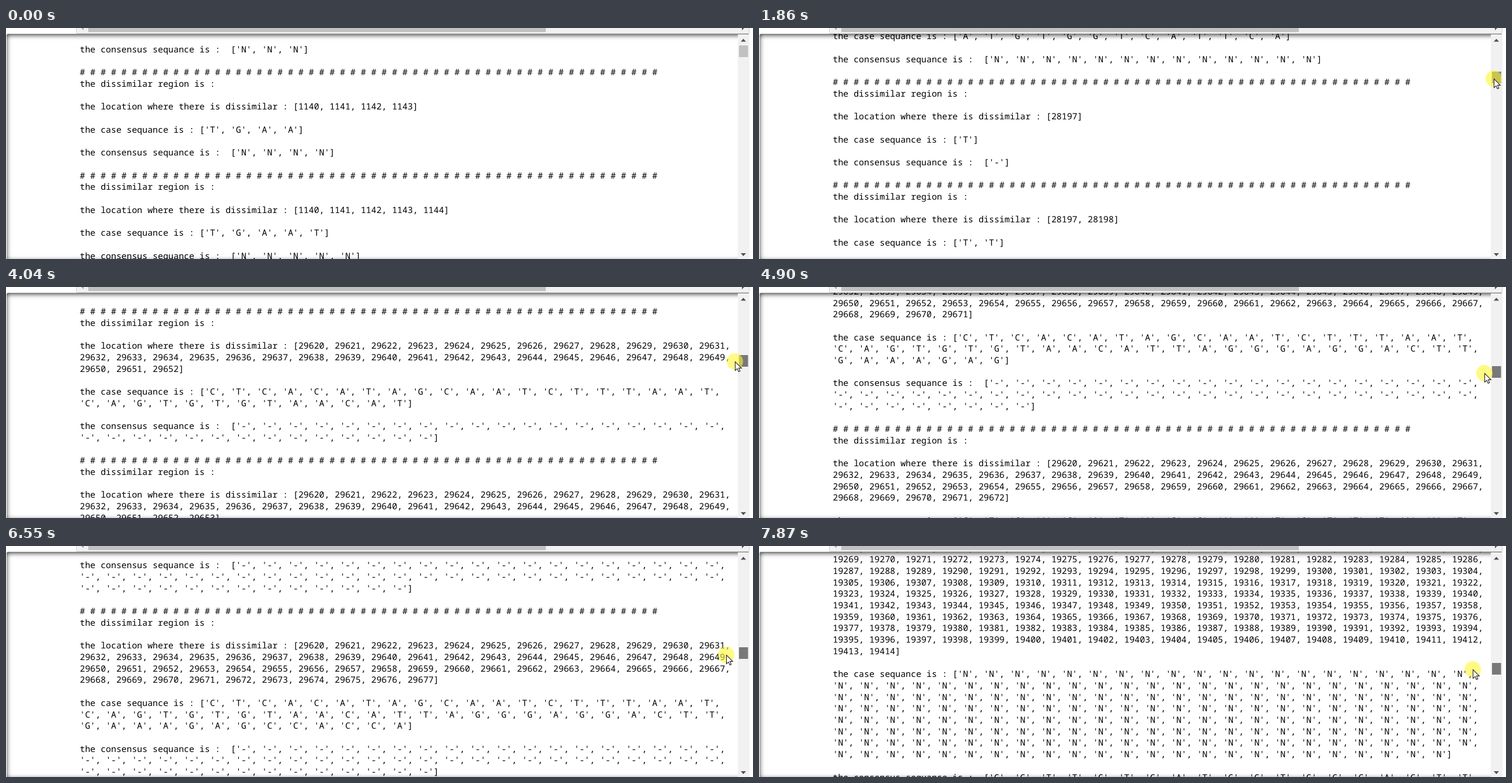
An HTML page that plays this animation: 1280x397 px, repeating every 8000 ms.

```html
<!DOCTYPE html>
<html lang="en">
<head>
<meta charset="utf-8">
<title>Sequence comparison output</title>
<style>
  html, body { margin: 0; width: 100%; height: 100%; overflow: hidden; background: #fff; }
  #stage { position: relative; width: 1280px; height: 397px; overflow: hidden; }
  #panel {
    position: absolute; left: 1px; top: 10px; width: 1273px; height: 388px; overflow: hidden;
    border-radius: 3px; box-shadow: inset 0 2px 9px rgba(0, 0, 0, .8);
  }
  #out {
    position: absolute; left: 125.5px; top: 0; margin: 0; white-space: pre; color: #000;
    font: 14.867px/19.7px "Noto Sans Mono", monospace;
    font-variant-ligatures: none; text-rendering: geometricPrecision;
  }
  svg { position: absolute; left: 0; top: 0; }
</style>
</head>
<body>
<div id="stage">
  <div id="panel"><pre id="out"></pre></div>
  <svg width="1280" height="397" viewBox="0 0 1280 397">
    <rect x="120.5" y="-5" width="1153" height="14.5" rx="2" fill="#f1f1f1" stroke="#cfcfcf"/>
    <rect x="141" y="0" width="784" height="7" fill="#c1c1c1"/>
    <path d="M133 -5V4L128.500 -.5Z" fill="#a3a3a3"/>
    <path d="M1261 -5V4L1265.500 -.5Z" fill="#505050"/>
    <rect x="1254" y="11" width="20" height="386" fill="#f1f1f1"/>
    <path d="M1259 23.500H1268L1263.500 18.500ZM1259 387H1268L1263.500 392Z" fill="#505050"/>
    <rect id="thumb" x="1256" y="30" width="15.500" height="20"/>
    <g id="mouse">
      <circle id="press" r="14" fill="rgb(255,246,50)" fill-opacity=".6"/>
      <path d="M.5 .5V15.500L4 12.300L6.300 17.500L8.800 16.400L6.500 11.400H11.300Z"
            fill="#fff" stroke="#222" stroke-width="1.100"/>
    </g>
  </svg>
</div>
<script>
const LOOP = 8000, COLS = 125, ROW = 19.7;
const $ = id => document.getElementById(id);

// Known beginnings of the sequences, keyed by position
const genes = {
  1140: 'TGAATGCAACCAAATGTGCCTTTCAACTCTCATGAAGTGTGATCATTGTGGTGAAACTTCATGG',
  19221: 'GGTTGTGATGGTGGCAGTT',
  27827: 'ATTTGTCACGCCTAAACGAACATGAAATTTCTTGTTTTCTTAGGAATCATCACAACTGTAGCTGCATTT' +
    'CACCAAGAATGTAGTTTACAGTCATGTACTCAACATCAACCATATGTAGTTGATGACCCGTGTCCTATTCACTTC' +
    'TATTCTAAATGGTATATTAGAGTAG',
  28184: 'ATGTGGTCATTCA',
  28197: 'TTCTAAAC',
  29620: 'CTCACATAGCAATCTTTAATCAGTGTGTAACATTAGGGAGGACTTGAAAGAGCCACCACATTTTCACC'
};

function base(start, i) {
  const known = genes[start] || '';
  if (i < known.length) return known[i];
  const r = Math.sin((start + i) * 12.9898) * 43758.5453;
  return 'ACGT'[Math.floor((r - Math.floor(r)) * 4)];
}

function wrap(head, items) {
  const lines = [];
  let line = head + '[';
  items.forEach((item, i) => {
    const word = item + (i < items.length - 1 ? ',' : ']');
    const next = line + (i ? ' ' : '') + word;
    if (next.length > COLS) { lines.push(line); line = word; }
    else line = next;
  });
  return [...lines, line];
}

// mark: letter standing for a gap; gapInCase: the gap is in the case row
function section(start, n, mark, gapInCase) {
  const list = f => Array.from({ length: n }, (_, i) => f(i));
  const seq = list(i => `'${base(start, i)}'`), gap = list(() => `'${mark}'`);
  return [
    '# '.repeat(56), 'the dissimilar region is :', '',
    ...wrap('the location where there is dissimilar : ', list(i => start + i)), '',
    ...wrap('the case sequance is : ', gapInCase ? gap : seq), '',
    ...wrap('the consensus sequance is :  ', gapInCase ? seq : gap), ''
  ];
}

// y: middle of the first line; each following section is one base longer
function page(y, start, n, mark, gapInCase, lead = []) {
  const lines = [...lead];
  for (let k = 0; y + lines.length * ROW < 420; k++) lines.push(...section(start, n + k, mark, gapInCase));
  return { text: lines.join('\n'), top: y - 20.3 };
}

// time, thumb top, pointer x, pointer y, page
const steps = [
  [0, 30, 1259, 41, page(-100.1, 1140, 3, 'N')],
  [1390, 56, 1259, 68, page(-120, 1140, 31, 'N')],
  [1780, 75, 1259, 87, page(-102.7, 28197, 1, '-', false, section(28184, 13, 'N'))],
  [2320, 78, 1258, 90, page(-64, 29620, 41, '-')],
  [3360, 81, 1257, 94, page(-71.5, 1140, 57, 'N')],
  [3890, 105, 1252, 117, page(-88, 29620, 12, '-')],
  [3970, 112, 1250, 123, page(-20, 29620, 26, '-')],
  [4040, 117, 1249, 128, page(43.4, 29620, 33, '-')],
  [4440, 126, 1246, 138, page(-135, 1140, 48, 'N')],
  [4820, 136, 1243, 148, page(-70, 29620, 52, '-')],
  [5300, 146, 1239, 158, page(-210, 27827, 118, 'N', true)],
  [5770, 155, 1236, 168, page(-282.9, 27827, 245, 'N', true)],
  [6160, 165, 1235, 178, page(-110, 29620, 37, '-')],
  [6550, 174, 1234, 187, page(-202.2, 29620, 57, '-')],
  [6780, 186, 1230, 199, page(-150, 19221, 92, 'N', true)],
  [7790, 201, 1223, 212, page(-94.2, 19221, 194, 'N', true)]
];

// Pointer comes in from the right edge and curves up to the thumb
function approach(t) {
  const i = Math.min(8, Math.floor((t - 70) / 77.5));
  const p = i / 8, e = p * p * (3 - 2 * p), q = 1 - e;
  const mix = (a, b, c) => q * q * a + 2 * q * e * b + e * e * c;
  return [mix(1272, 1202, 1259), mix(371, 240, 41)];
}

let shown;
function draw(t) {
  const [, top, px, py, view] = steps.findLast(s => s[0] <= t);
  if (view !== shown) {
    shown = view;
    $('out').textContent = view.text;
    $('out').style.transform = `translateY(${view.top}px)`;
  }
  const pressed = t >= 1070;
  const [x, y] = pressed ? [px, py] : approach(Math.max(t, 70));
  $('thumb').setAttribute('y', top);
  $('thumb').setAttribute('fill', pressed ? '#787878' : t >= 690 ? '#a8a8a8' : '#c1c1c1');
  $('mouse').setAttribute('transform', `translate(${x} ${y})`);
  $('mouse').setAttribute('visibility', t < 70 ? 'hidden' : 'visible');
  $('press').setAttribute('display', pressed ? 'inline' : 'none');
}

const begin = performance.now();
function tick() {
  draw((performance.now() - begin) % LOOP);
  requestAnimationFrame(tick);
}
tick();
</script>
</body>
</html>
```
